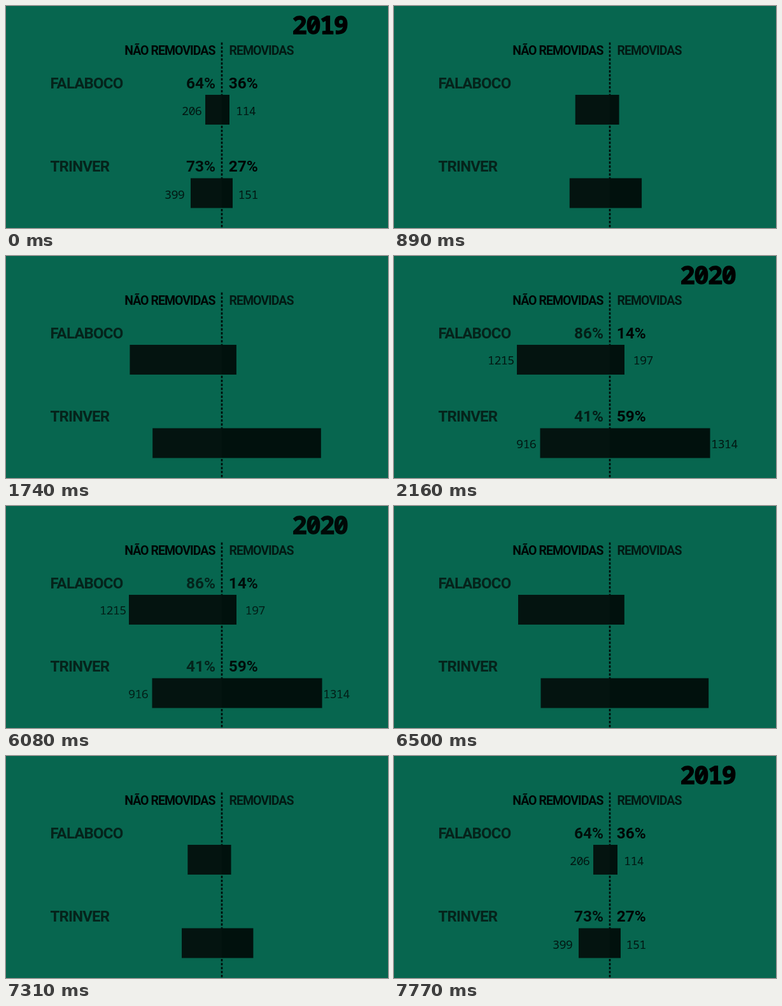
An HTML page that plays this animation: 600x350 px, repeating every 8000 ms.

```html
<!DOCTYPE html>
<html lang="pt">
<head>
<meta charset="utf-8">
<title>Publicações removidas</title>
<style>
  html, body { margin: 0; width: 100%; height: 100%; overflow: hidden; background: #07664f; }
  svg { display: block; width: 600px; height: 350px; }
  text { font-family: Roboto, "Open Sans", sans-serif; font-weight: 700; }
  .head { font-size: 19.5px; letter-spacing: -.05em; }
  .name { font-size: 24px; letter-spacing: -.035em; fill: #05231b; }
  .pct { font-size: 24.4px; }
  .num { font: 450 18.5px "Noto Sans Mono", "DejaVu Sans Mono", monospace; letter-spacing: -.7px; }
  .year { font: 900 39px "Noto Sans Mono", "DejaVu Sans Mono", monospace; letter-spacing: -1.7px;
          stroke: #000; stroke-width: 1.3px; }
</style>
</head>
<body>
<svg viewBox="0 0 600 350">
  <rect width="600" height="350" fill="#07664f"/>
  <path d="M339 57.5V350" stroke="#000c09" stroke-width="2.6" stroke-dasharray="3.65 2.6"/>
  <text class="head" x="328.5" y="77" text-anchor="end" fill="#000705">NÃO REMOVIDAS</text>
  <text class="head" x="350.5" y="77" fill="#031a14">REMOVIDAS</text>
  <text class="name" x="69.5" y="130">FALABOCO</text>
  <text class="name" x="69.5" y="261">TRINVER</text>
  <g id="bars"></g>
  <g id="y2019"></g>
  <g id="y2020"></g>
</svg>
<script>
const LOOP = 8000, MIRROR = 8200, AXIS = 339;
const NS = "http://www.w3.org/2000/svg";
const $ = id => document.getElementById(id);

function add(parent, tag, attrs, content = "") {
  const el = document.createElementNS(NS, tag);
  for (const k in attrs) el.setAttribute(k, attrs[k]);
  el.textContent = content;
  parent.append(el);
  return el;
}

// each row: left percent, right percent, then [value, x, baseline] on both sides
const years = {
  2019: { left: "#010f0b", rows: [
    ["64%", "36%", ["206", 276, 172], ["114", 361, 172]],
    ["73%", "27%", ["399", 249, 304], ["151", 364.5, 304]]] },
  2020: { left: "#041e17", rows: [
    ["86%", "14%", ["1215", 147, 171], ["197", 375.5, 171]],
    ["41%", "59%", ["916", 192, 303], ["1314", 498, 303]]] }
};

for (const [year, { left, rows }] of Object.entries(years)) {
  const g = $("y" + year);
  add(g, "text", { class: "year", x: 449.5, y: 43.5 }, year);
  rows.forEach(([l, r, ...nums], i) => {
    const y = 130 + 131 * i;
    add(g, "text", { class: "pct", x: 329, y, "text-anchor": "end", fill: left }, l);
    add(g, "text", { class: "pct", x: 349.8, y, fill: "#000504" }, r);
    for (const [v, x, base] of nums)
      add(g, "text", { class: "num", x, y: base, fill: "#021712" }, v);
  });
}

// left and right edges in both years
const bars = [
  { y: 140, from: [313, 351], to: [193, 362] },
  { y: 271.5, from: [290, 356], to: [229.5, 496.5] }
].map(b => ({
  ...b,
  l: add($("bars"), "rect", { y: b.y, height: 47, fill: "#041410" }),
  r: add($("bars"), "rect", { x: AXIS, y: b.y, height: 47, fill: "#01110d" })
}));

const clamp = v => Math.min(1, Math.max(0, v));
const ramp = (t, a, b) => clamp((t - a) / (b - a));
const mix = (a, b, p) => a + (b - a) * p;

// cubic-bezier(.5, 0, 0, 1)
function ease(x) {
  if (x <= 0 || x >= 1) return clamp(x);
  let lo = 0, hi = 1;
  for (let i = 0; i < 24; i++) {
    const u = (lo + hi) / 2;
    if (1.5 * u * (1 - u) ** 2 + u ** 3 < x) lo = u; else hi = u;
  }
  return lo * lo * (3 - 2 * lo);
}

function draw(t) {
  // the way back is the way out played in reverse
  const s = t < LOOP / 2 ? t : MIRROR - t;
  const p = ease(ramp(s, 514, 2004));
  for (const { from, to, l, r } of bars) {
    const x = mix(from[0], to[0], p);
    l.setAttribute("x", x);
    l.setAttribute("width", AXIS - x);
    r.setAttribute("width", mix(from[1], to[1], p) - AXIS);
  }
  $("y2019").style.opacity = 1 - ramp(s, 465, 865);
  $("y2020").style.opacity = ramp(s, 1755, 2155);
}

const start = performance.now();
function tick() {
  draw((performance.now() - start) % LOOP);
  requestAnimationFrame(tick);
}
tick();
</script>
</body>
</html>
```
